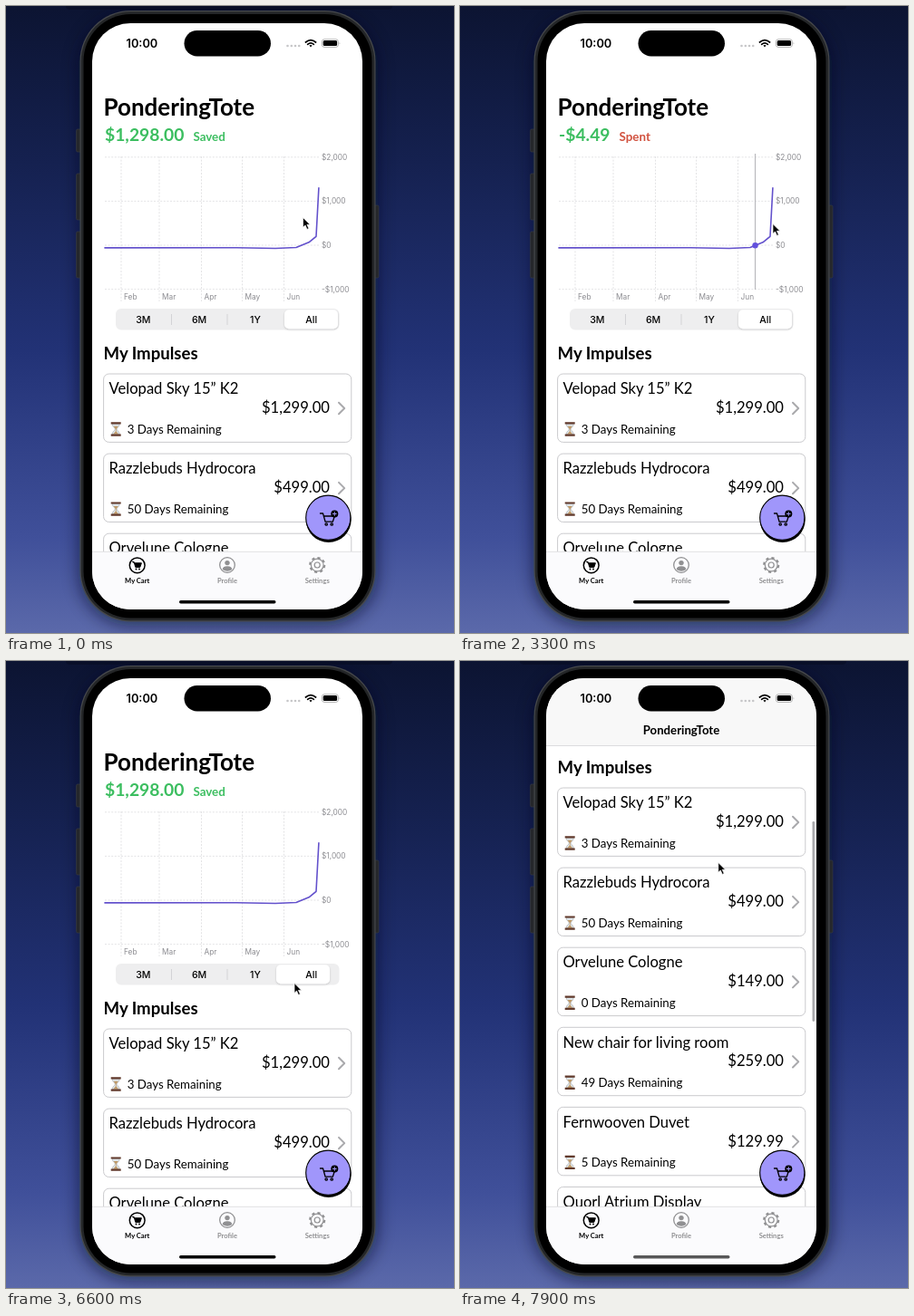
An HTML page for the animation above (8000 ms loop, 494 px wide and 692 px high).

```html
<!DOCTYPE html>
<html lang="en">
<head>
<meta charset="utf-8">
<title>Savings app</title>
<style>
  html, body { margin: 0; width: 100%; height: 100%; overflow: hidden; background: #16204f; }
  svg { display: block; width: 494px; height: 692px; }
  text { font-family: Lato, sans-serif; white-space: pre; }
  .ui { font-family: Inter, sans-serif; }
  .axis { font: 8.3px Inter, sans-serif; fill: #8b8b90; }
  .grid { stroke: #dcdcdf; stroke-width: .8; stroke-dasharray: 2 1.6; }
  .seg { font: 500 10.6px Inter, sans-serif; text-anchor: middle; }
  .tab { font: 700 7.6px Lato, sans-serif; text-anchor: middle; }
  .line { fill: none; stroke-linecap: round; stroke-linejoin: round; }
</style>
</head>
<body>
<svg id="stage" viewBox="0 0 494 692" xmlns="http://www.w3.org/2000/svg">
  <defs>
    <linearGradient id="sky" x2="0" y2="1">
      <stop offset="0" stop-color="#0c1432"/>
      <stop offset=".25" stop-color="#152150"/>
      <stop offset=".55" stop-color="#223276"/>
      <stop offset=".85" stop-color="#40509a"/>
      <stop offset="1" stop-color="#5b69aa"/>
    </linearGradient>
    <filter id="soft" x="-20%" y="-20%" width="140%" height="140%"><feGaussianBlur stdDeviation="9"/></filter>
    <filter id="lift" x="-20%" y="-40%" width="140%" height="200%">
      <feDropShadow dx="0" dy="1" stdDeviation="1.2" flood-opacity=".18"/>
    </filter>
    <clipPath id="screen"><rect x="95" y="19" width="298" height="647" rx="42"/></clipPath>
    <clipPath id="page"><rect x="95" y="93" width="298" height="510"/></clipPath>
    <g id="cart" class="line">
      <path d="M-8-6h3l2.6 9.2h8.2l2-6.2h-11.6"/>
      <circle cx="-1.3" cy="6" r="1.2"/><circle cx="4.7" cy="6" r="1.2"/>
    </g>
    <g id="hourglass">
      <path d="M-4-6h8c0 4-3 4-3 6s3 2 3 6h-8c0-4 3-4 3-6s-3-2-3-6z" fill="#dfe6ea" stroke="#9aa0a5" stroke-width=".6"/>
      <path d="M-2.6-3.2h5.2L.4 0v2.6L3 5.6h-6L-.4 2.6V0z" fill="#c09a68"/>
      <path d="M-5.5-6.6h11M-5.5 6.6h11" stroke="#623a2c" stroke-width="2.2"/>
    </g>
  </defs>

  <rect width="494" height="692" fill="url(#sky)"/>
  <rect x="80" y="8" width="330" height="676" rx="58" fill="#050a20" opacity=".55" filter="url(#soft)"/>
  <path d="M66 0h360v1q-1 3-5 3H71q-4 0-5-3z" fill="#080d22" opacity=".6"/>
  <g fill="#25272b" stroke="#3c3e42" stroke-width=".6">
    <rect x="77.5" y="136" width="6" height="25" rx="1.5"/>
    <rect x="77.5" y="185" width="6" height="51" rx="1.5"/>
    <rect x="77.5" y="249" width="6" height="51" rx="1.5"/>
    <rect x="405" y="220" width="6" height="80" rx="1.5"/>
  </g>
  <rect x="81.5" y="5" width="326" height="674.5" rx="56" fill="#46484b"/>
  <rect x="82.7" y="6.2" width="323.6" height="672" rx="55" fill="#242628"/>
  <rect x="85.5" y="9" width="318" height="666.5" rx="52" fill="#000"/>

  <g clip-path="url(#screen)">
    <rect x="95" y="19" width="298" height="647" fill="#fff"/>
    <g clip-path="url(#page)">
      <g id="content">
        <text x="107.5" y="121" font-size="26" font-weight="700">PonderingTote</text>
        <text x="109" y="149" font-weight="700"><tspan id="amount" font-size="19.3"></tspan><tspan id="verdict" dx="10" font-size="13.4"></tspan></text>
        <g id="axes"></g>
        <g id="months"></g>
        <path id="rule" stroke="#b9b9bd" stroke-width="1.2"/>
        <path id="plot" class="line" stroke="#6351cc" stroke-width="1.6"/>
        <circle id="dot" r="3.2" fill="#6351dd"/>
        <rect x="121" y="334" width="246.5" height="23.5" rx="6" fill="#eeeeef"/>
        <g id="dividers" stroke="#d3d3d6"></g>
        <rect id="thumb" y="335.3" width="59" height="21" rx="5" fill="#fff" filter="url(#lift)"/>
        <g id="segments"></g>
        <text x="107.5" y="389.5" font-size="18.6" font-weight="700">My Impulses</text>
        <g id="cards"></g>
      </g>
    </g>

    <g id="bar">
      <rect x="95" y="19" width="298" height="74.5" fill="#f8f8f8"/>
      <path d="M95 93.5h298" stroke="#d5d5d7" stroke-width=".8"/>
    </g>
    <text id="barTitle" x="244" y="81" font-size="13.2" font-weight="700" text-anchor="middle">PonderingTote</text>
    <rect id="scroller" x="388.5" width="2.6" height="221" rx="1.3" fill="#a9a9ac"/>

    <text class="ui" x="132.5" y="45.6" font-size="12.8" font-weight="600">10:00</text>
    <g fill="#c6c6c8"><circle cx="310.5" cy="44" r="1.3"/><circle cx="314.8" cy="44" r="1.3"/><circle cx="319" cy="44" r="1.3"/><circle cx="323.2" cy="44" r="1.3"/></g>
    <g class="line" stroke="#000" stroke-width="1.7" stroke-linecap="butt">
      <path d="M330.4 40q5.6-4.8 11.2 0M332.6 42.3q3.4-2.8 6.8 0"/>
      <path d="M334.4 43.6q1.6-1 3.2 0L336 45.5z" fill="#000" stroke="none"/>
    </g>
    <rect x="348.4" y="36.8" width="18" height="8.6" rx="2.6" fill="none" stroke="#aaa" stroke-width=".9"/>
    <rect x="349.7" y="38.1" width="15.4" height="6" rx="1.5"/>
    <path d="M367.6 39.7q1.7 1.4 0 2.8z" fill="#aaa"/>

    <circle cx="355.7" cy="567" r="25"/>
    <circle cx="355.3" cy="564.7" r="24.6" fill="#a096fb" stroke="#000" stroke-width="1.1"/>
    <use href="#cart" x="354.5" y="566" stroke="#000" stroke-width="1.3"/>
    <circle cx="362.3" cy="560.5" r="4" fill="#000"/>
    <path d="M360 560.5h4.6M362.3 558.2v4.6" stroke="#a096fb" stroke-width="1"/>

    <rect x="95" y="602" width="298" height="64" fill="#fbfbfd"/>
    <path d="M95 602.3h298" stroke="#d6d6d8" stroke-width=".7"/>
    <circle cx="144.7" cy="617.3" r="8.4" fill="none" stroke="#000" stroke-width="1.5"/>
    <path d="M139.3 613.4h1.8l1.7 6h5l1.6-4.6h-7.6z" stroke="#000" stroke-width="1"/>
    <circle cx="143.5" cy="621.6" r="1"/><circle cx="147" cy="621.6" r="1"/>
    <g fill="#909092">
      <circle cx="244" cy="617" r="8.3" fill="none" stroke="#909092" stroke-width="1.3"/>
      <circle cx="244" cy="614.6" r="2.7"/><path d="M238.7 622q0-3.8 5.3-3.8t5.3 3.8q-5 3.4-10.6 0z"/>
    </g>
    <g fill="none" stroke="#909092">
      <circle cx="343.2" cy="617" r="8.1" stroke-width="2" stroke-dasharray="3.18 3.18"/>
      <circle cx="343.2" cy="617" r="6.9" stroke-width="1.2"/><circle cx="343.2" cy="617" r="3" stroke-width="1.2"/>
    </g>
    <text class="tab" x="144.7" y="637">My Cart</text>
    <text class="tab" x="244" y="637" fill="#909092">Profile</text>
    <text class="tab" x="343.2" y="637" fill="#909092">Settings</text>
    <rect id="home" x="191" y="656" width="106.5" height="3.4" rx="1.7"/>
    <rect x="196.5" y="27" width="95.5" height="28.5" rx="14.2"/>
  </g>
  <path id="cursor" d="M0 0v10.8l2.5-2.3 2 4.4 1.9-.9-2-4.2h3.4z" stroke="#fff" stroke-width=".7"/>
</svg>

<script>
const LOOP = 8000, STEP = 100, RIGHT = 344.9;
const $ = id => document.getElementById(id);
const set = (id, attrs) => { for (const k in attrs) $(id).setAttribute(k, attrs[k]); };
const clamp = v => Math.max(0, Math.min(1, v));
const moneyY = v => 264 - v * 0.0487;

// Value i of a piecewise linear table of [key, value, ...]
function track(table, key, i = 1) {
  if (key <= table[0][0]) return table[0][i];
  for (let n = 1; n < table.length; n++) {
    const a = table[n - 1], b = table[n];
    if (key <= b[0]) return a[i] + (b[i] - a[i]) * (key - a[0]) / (b[0] - a[0]);
  }
  return table[table.length - 1][i];
}

const savings = [[109, -60], [253, -55.19], [297, -72], [320, -50], [334, 65], [342, 200], [RIGHT, 1298]];
const monthX = { Oct: -58, Jan: 80, Feb: 127, Mar: 169, Apr: 215.5, May: 260.5, Jun: 306.5 };
const ranges = {
  all: { zoom: 1, skip: 0, lift: 0, months: ['Feb', 'Mar', 'Apr', 'May', 'Jun'] },
  year: { zoom: .43, skip: 0, lift: 0, months: ['Oct', 'Jan', 'Apr'] },
  half: { zoom: .865, skip: 0, lift: 0, months: ['Feb', 'Mar', 'Apr', 'May', 'Jun'] },
  quarter: { zoom: 1.74, skip: 1, lift: 56, months: ['Apr', 'May', 'Jun'] }
};
const switches = [[0, 'all'], [4600, 'year'], [5300, 'half'], [5700, 'quarter'], [6400, 'all']];

const rulePath = [[600, RIGHT], [800, 334], [1100, 334], [1300, 320], [1500, 297], [1700, 285], [1900, 256],
  [2000, 254], [2100, 253], [2500, 253], [2700, 290], [2900, 297], [3050, 320], [3200, 320],
  [3300, 325.54], [3400, 339], [3500, 344], [3600, RIGHT]];
const amountTint = [[1100, 1], [1300, 0], [3200, 0], [3300, 1]];
const verdictTint = [[1150, 1], [1450, 0], [3250, 0], [3300, .15], [3600, 1]];
const thumbPath = [[4500, 307], [4600, 299], [4700, 270], [4800, 250], [4900, 245], [5200, 245], [5300, 230],
  [5400, 195], [5500, 184], [5600, 184], [5700, 176], [5800, 142], [5900, 126], [6000, 122],
  [6300, 122], [6400, 150], [6500, 250], [6600, 298], [6700, 307]];
const cursorPath = [[0, 327.5, 233.5], [900, 330, 234], [1300, 310, 235], [1700, 254, 235], [2000, 214, 235],
  [2300, 206, 235], [2500, 225, 236], [2900, 305, 239], [3300, 345, 240.5], [3700, 345, 241],
  [4100, 318, 295], [4500, 283, 343], [4600, 281, 343], [4750, 275, 343], [5000, 218, 343],
  [5300, 214, 343], [5500, 147, 343], [5700, 146, 343.5], [5850, 147, 346], [6200, 332, 345],
  [6500, 332, 345], [7000, 262, 398], [7100, 262, 398], [7200, 262, 373], [7300, 262, 346],
  [7400, 264, 312], [7500, 270, 275], [7600, 278, 243], [7700, 283, 227], [7900, 284.8, 222.5]];
const scrollPath = [[7100, 0], [7200, 13], [7300, 39.5], [7500, 118], [7700, 200], [7800, 236], [7900, 266]];

const items = [
  ['Velopad Sky 15” K2', '$1,299.00', 3], ['Razzlebuds Hydrocora', '$499.00', 50],
  ['Orvelune Cologne', '$149.00', 0], ['New chair for living room', '$259.00', 49],
  ['Fernwooven Duvet', '$129.99', 5], ['Quorl Atrium Display', '$1,599.00', 12]
];
$('cards').innerHTML = items.map(([name, price, days], i) => `
  <g transform="translate(0 ${406 + i * 88.1})">
    <rect x="107.6" width="273.2" height="75.4" rx="6" fill="#fff" stroke="#cacacd"/>
    <text x="113.5" y="22.3" font-size="16.6">${name}</text>
    <text x="357" y="43.2" font-size="16.6" text-anchor="end">${price}</text>
    <path class="line" d="M367 31.8l6.2 6.2-6.2 6.2" stroke="#a9a9ac" stroke-width="2"/>
    <use href="#hourglass" x="121.2" y="61"/>
    <text x="133.7" y="65.6" font-size="13.3">${days} Days Remaining</text>
  </g>`).join('');
$('axes').innerHTML = ['$2,000', '$1,000', '$0', '-$1,000'].map((label, i) => {
  const y = 166.8 + i * 48.6;
  return `<path class="grid" d="M109 ${y}H345"/><text class="axis" x="348" y="${y + 3}">${label}</text>`;
}).join('');
$('dividers').innerHTML = [182.5, 244, 305.8].map(x => `<path d="M${x} 340v12"/>`).join('');
$('segments').innerHTML = ['3M', '6M', '1Y', 'All'].map((s, i) =>
  `<text class="seg" x="${151.3 + i * 61.8}" y="349.6">${s}</text>`).join('');

function showRange(name) {
  const { zoom, skip, lift, months } = ranges[name];
  const mapX = x => RIGHT - (RIGHT - x) * zoom;
  const points = savings.slice(skip).map(([x, v]) => `${mapX(x).toFixed(2)} ${moneyY(v + lift).toFixed(2)}`);
  set('plot', { d: 'M' + points.join('L') });
  $('months').innerHTML = months.map(m => {
    const x = mapX(monthX[m]);
    return `<path class="grid" d="M${x} 166V326"/><text class="axis" x="${x + 3}" y="323.8">${m}</text>`;
  }).join('');
}

function tint(mix) {
  const red = [235, 62, 56], green = [60, 190, 96];
  return `rgb(${red.map((c, i) => Math.round(c + (green[i] - c) * mix))})`;
}

let shown;
function render(t) {
  const range = switches.filter(s => s[0] <= t).pop()[1];
  if (range !== shown) showRange(shown = range);

  const x = track(rulePath, t), value = track(savings, x);
  const visible = t >= 600 && t < 3700 ? 1 : 0;
  set('rule', { d: `M${x} 163V313`, opacity: visible });
  set('dot', { cx: x, cy: moneyY(value), opacity: visible });

  const digits = Math.abs(value).toLocaleString('en-US', { minimumFractionDigits: 2, maximumFractionDigits: 2 });
  const mood = track(verdictTint, t);
  $('amount').textContent = (value < 0 ? '-$' : '$') + digits;
  $('verdict').textContent = mood > .5 ? 'Saved' : 'Spent';
  set('amount', { fill: tint(track(amountTint, t)) });
  set('verdict', { fill: tint(mood) });

  const thumb = track(thumbPath, t);
  set('thumb', { x: thumb });
  [182.5, 244, 305.8].forEach((d, i) => {
    $('dividers').children[i].setAttribute('opacity', d > thumb - 12 && d < thumb + 71 ? 0 : 1);
  });

  const scroll = track(scrollPath, t);
  set('content', { transform: `translate(0 ${-scroll})` });
  set('bar', { opacity: clamp((scroll - 40) / 25) });
  set('barTitle', { opacity: clamp((scroll - 36) / 32) });
  set('scroller', { y: 85.4 + scroll * .344, opacity: scroll > 0 ? 1 : 0 });
  set('home', { opacity: 1 - .35 * clamp((scroll - 180) / 80) });
  set('cursor', { transform: `translate(${track(cursorPath, t)} ${track(cursorPath, t, 2)})` });
}

const start = performance.now();
function tick() {
  const t = (performance.now() - start) % LOOP;
  render(Math.floor(t / STEP) * STEP);
  requestAnimationFrame(tick);
}
tick();
</script>
</body>
</html>
```
